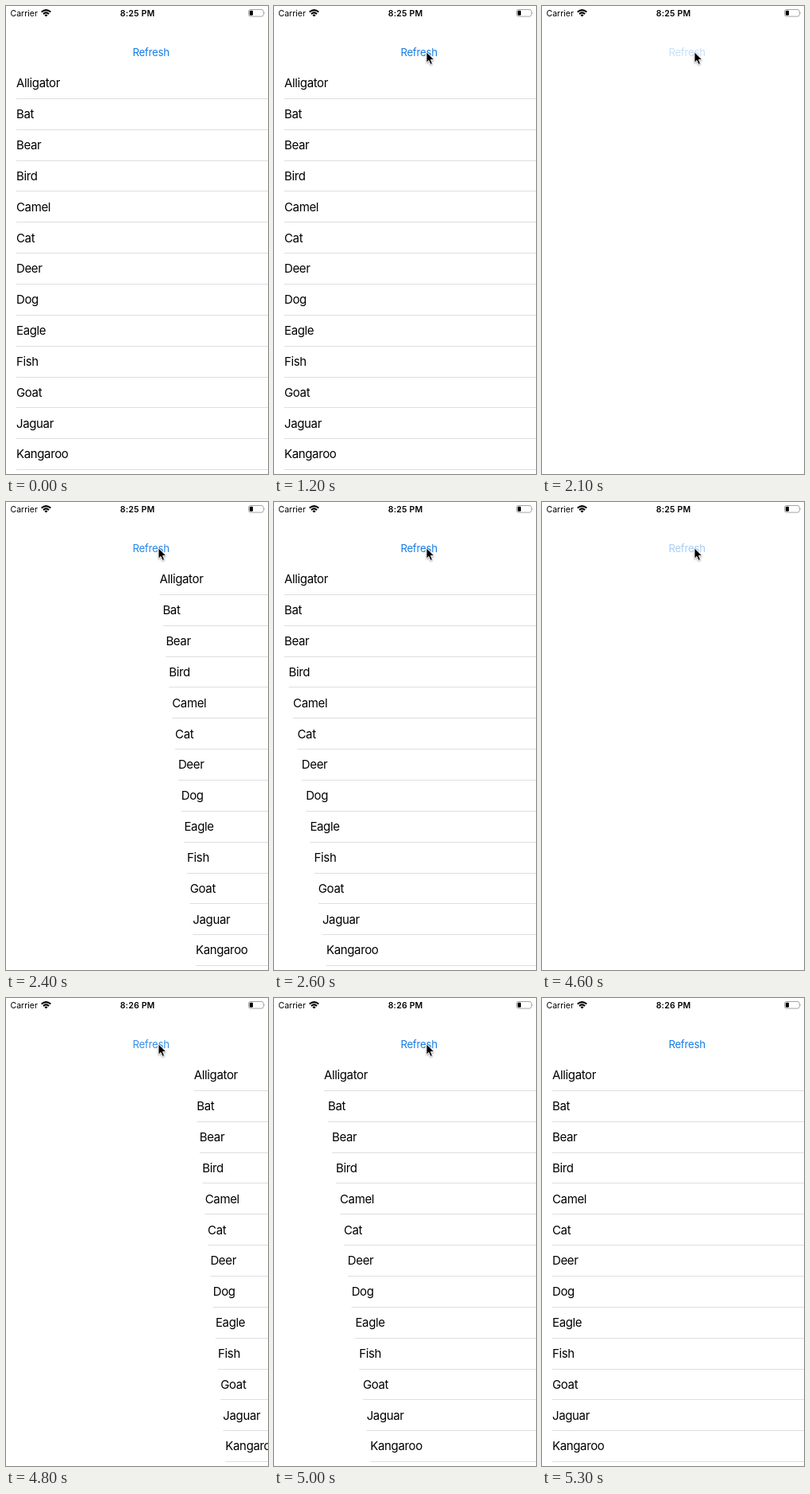
Animation of 330x588 px, one loop 6.7 s. Source, as an HTML page:

```html
<!DOCTYPE html>
<html lang="en">
<head>
<meta charset="utf-8">
<title>Animal list</title>
<style>
  html, body { margin: 0; width: 100%; height: 100%; overflow: hidden; background: #fff; }
  svg { display: block; width: 100%; height: 100%; }
  text { font-family: Inter, Roboto, sans-serif; }
  .status { font-size: 10.5px; }
  .clock { font-weight: 600; letter-spacing: .2px; text-anchor: middle; }
  .button { font-size: 13.2px; letter-spacing: -.25px; fill: #147ce5; }
  #list text { font-size: 15px; letter-spacing: -.36px; }
  #list rect { fill: #dedee0; }
  #cursor { filter: drop-shadow(.4px 1.2px 1px rgba(0, 0, 0, .35)); }
</style>
</head>
<body>
<svg viewBox="0 0 330 588">
  <text class="status" x="5.5" y="12.7">Carrier</text>
  <g fill="none" stroke="#000" stroke-width="2">
    <path d="M44.7 7.6Q50.5 2.6 56.3 7.6"/>
    <path d="M46.9 9.9Q50.5 6.9 54.1 9.9"/>
  </g>
  <path d="M48.4 11.2Q50.5 9.6 52.6 11.2L50.5 13.4Z"/>
  <text class="status clock" id="clock" x="165.6" y="12.7">8:25 PM</text>
  <rect x="305.5" y="4.5" width="18.8" height="8.6" rx="2.4" fill="none" stroke="#a3a3a3"/>
  <rect x="306.8" y="5.8" width="4.2" height="6" rx="1"/>
  <path d="M325.3 7.2Q326.8 8.8 325.3 10.4Z" fill="#a3a3a3"/>
  <text class="button" id="button" x="159.4" y="63.3">Refresh</text>
  <g id="list"></g>
  <path id="cursor" d="M0 0V13.4L3 10.6 5.1 15.6 7.5 14.6 5.5 9.7H9.8Z" stroke="#fff" stroke-width=".9"/>
</svg>
<script>
  const LOOP = 6700, STEP = 100;
  const WIDTH = 330, LEFT = 13;
  const SLIDE = 500, STAGGER = 5, FADE = 450;
  const ROW = 38.84;
  const taps = [{ down: 2000, up: 2090 }, { down: 4520, up: 4547 }];
  const animals = ['Alligator', 'Bat', 'Bear', 'Bird', 'Camel', 'Cat', 'Deer',
                   'Dog', 'Eagle', 'Fish', 'Goat', 'Jaguar', 'Kangaroo'];

  const byId = id => document.getElementById(id);
  const clamp = v => Math.min(1, Math.max(0, v));
  const list = byId('list'), button = byId('button');
  const clock = byId('clock'), cursor = byId('cursor');

  function add(tag, attrs) {
    const el = document.createElementNS('http://www.w3.org/2000/svg', tag);
    for (const key in attrs) el.setAttribute(key, attrs[key]);
    return list.appendChild(el);
  }

  const rows = animals.map((name, i) => {
    const label = add('text', { y: 102.4 + i * ROW });
    label.textContent = name;
    const line = add('rect', { y: Math.round(115.95 + i * ROW), width: WIDTH, height: 1 });
    return [label, line];
  });

  // cubic-bezier(.42, 0, 1, 1)
  function easeIn(x) {
    if (x <= 0 || x >= 1) return clamp(x);
    let lo = 0, hi = 1;
    for (let i = 0; i < 24; i++) {
      const s = (lo + hi) / 2;
      if (1.26 * s + .48 * s * s - .74 * s ** 3 < x) lo = s; else hi = s;
    }
    return 3 * lo * lo - 2 * lo ** 3;
  }

  function buttonAlpha(t) {
    const tap = taps.findLast(p => t >= p.down);
    return tap ? 1 - .8 * (1 - clamp((t - tap.up) / FADE)) ** 2 : 1;
  }

  function cursorPos(t) {
    if (t < 400 || t >= 5300) return null;
    if (t > 5000) {
      const k = (t - 5000) / 200;
      return [192 + 24 * k * k, 57.8 + 1.7 * k * k];
    }
    const rest = (1 - clamp((t - 400) / 600)) ** 2;
    return [192 + 128 * rest, 57.8 - 7 * rest];
  }

  function draw(t) {
    const tap = taps.findLast(p => t >= p.up);
    rows.forEach((row, i) => {
      const done = tap ? easeIn((t - tap.up - i * STAGGER) / SLIDE) : 1;
      const x = LEFT + WIDTH * (1 - done);
      row.forEach(el => el.setAttribute('x', x));
    });
    button.setAttribute('opacity', buttonAlpha(t));
    clock.textContent = t < 4800 ? '8:25 PM' : '8:26 PM';
    const pos = cursorPos(t);
    cursor.style.visibility = pos ? 'visible' : 'hidden';
    if (pos) cursor.setAttribute('transform', `translate(${pos})`);
  }

  const start = performance.now();
  function tick() {
    // the small lead keeps timer rounding from holding a step too long
    const t = (performance.now() - start + 2) % LOOP;
    draw(Math.floor(t / STEP) * STEP);
    requestAnimationFrame(tick);
  }
  tick();
</script>
</body>
</html>
```
